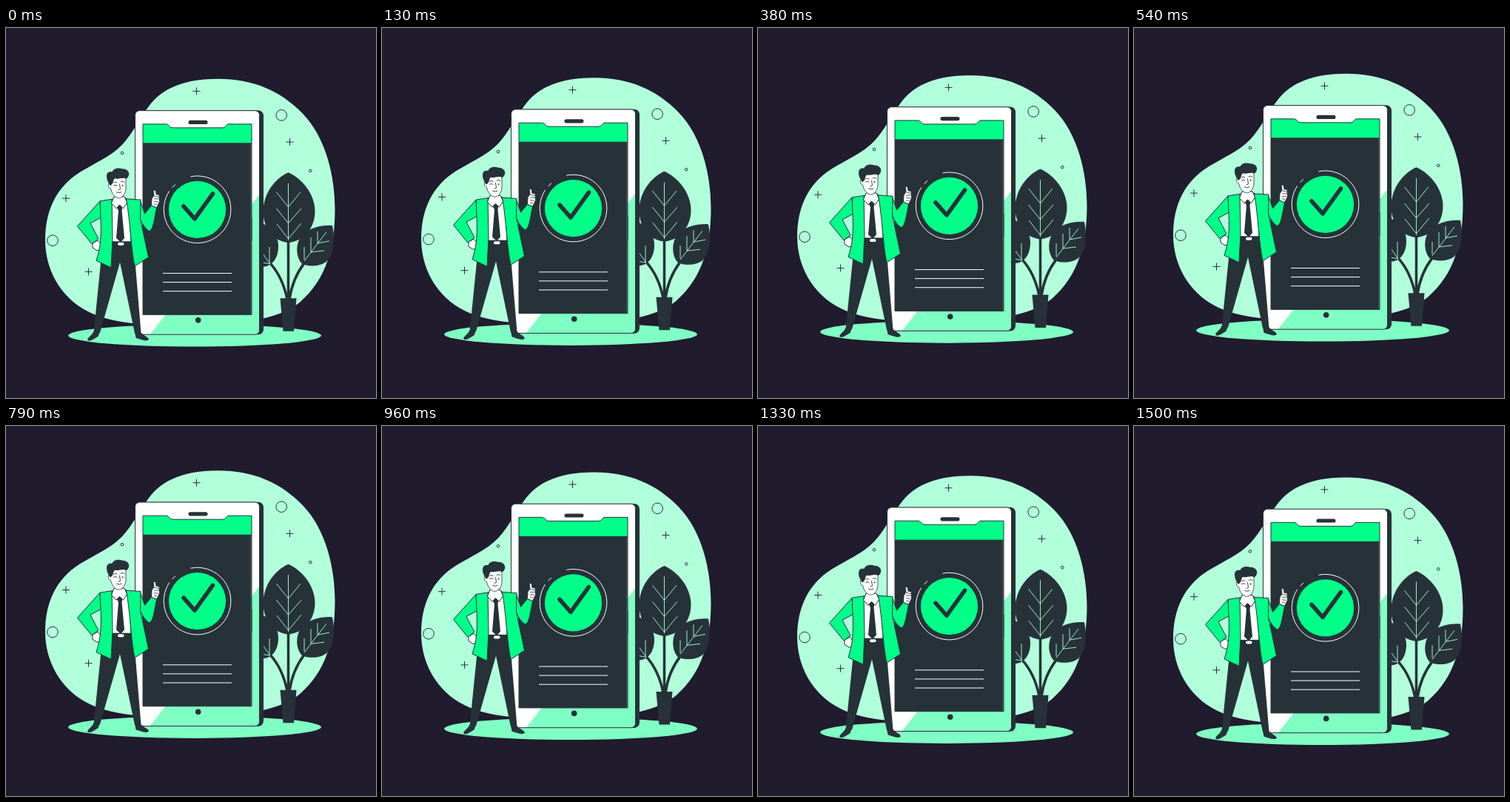
Recreate the animation shown at these times as an HTML page. Size 500 by 500 pixels, loop 1.54 s.

```html
<!DOCTYPE html>
<html lang="en">
<head>
<meta charset="utf-8">
<title>Payment confirmed</title>
<style>
  html, body { margin: 0; width: 100%; height: 100%; overflow: hidden; background: #201b2d; }
  svg { display: block; width: 100%; height: 100%; }
  .ink { fill: #263238; }
  .mint { fill: #80ffc4; }
  .green { fill: #00ff88; }
  .white { fill: #fff; }
  .line { fill: none; stroke: #263238; }
  .edge { stroke: #263238; stroke-linejoin: round; }
  .vein { fill: none; stroke: #b2ffdc; stroke-width: .9; }
  .thin { fill: none; stroke: #fff; }
</style>
</head>
<body>
<svg viewBox="0 0 500 500">
  <g id="scene">
    <path fill="#b2ffdc" d="M53 287C53 247 68 215 100 195C121 182 140 175 157 158C172 142 181 121 193 106C207 87 232 69 287 69C334 69 371 85 401 116C433 149 444.500 202 444.500 245C444.500 295 434 339 397 371C368 395 310 402 250 402C195 402 146 401 112 384C72 364 53 325 53 287Z"/>
    <ellipse class="mint" cx="255" cy="415.700" rx="171" ry="15"/>
    <path class="line" d="M252.500 85.500h10m-5-5v10M378.500 154.200h10m-5-5v10M76 230.300h10m-5-5v10M106.500 329.500h10m-5-5v10"/>
    <g class="line">
      <circle cx="372.200" cy="118" r="7.300"/>
      <circle cx="63" cy="287.300" r="7.300"/>
      <circle cx="157" cy="169" r="1.800"/>
      <circle cx="411.300" cy="193" r="1.800"/>
    </g>

    <g id="plant">
      <path class="ink" d="M381.500 195.500C399 203 417.500 224 417.500 248C417.500 270 403 288 381.500 290.500C360 288 347.500 270 347.500 248C347.500 224 364 203 381.500 195.500Z"/>
      <path class="ink" d="M340 262C356 266 368 279 368 295C368 311 360 323 346 323Z"/>
      <path class="ink" d="M441 267C445 286 443 305 434 315C425 323 410 323 400 319C391 309 391 291 400 280C410 270 426 266 441 267Z"/>
      <path class="line" stroke-width="3.500" d="M381.500 288V368M357 318Q374 337 380 367M403 318Q387 339 383 367"/>
      <path class="ink" d="M370.500 365.500H392.500L389 410H374.500Z"/>
      <path class="vein" d="M381.500 210V287M365.500 222L381.500 242L398 222M365.500 244L381.500 264L399 244M366 265L381.500 285L399 264"/>
      <path class="vein" d="M433 276L403 315M421 291V275M421 291L437 288M412 303V283M412 303L430 301M403 313V296"/>
      <path class="vein" d="M357 319L347 305M356 318V296M357 319L346 317"/>
    </g>

    <g id="phone">
      <rect class="ink" x="178" y="111.500" width="170" height="303" rx="7"/>
      <rect class="white" x="174.500" y="111.800" width="168" height="302.500" rx="6"/>
      <path class="mint" d="M342 226V408Q342 413.800 336 413.800H195Z"/>
      <rect class="line" x="174.500" y="111.800" width="168" height="302.500" rx="6"/>
      <rect class="ink edge" x="185" y="156" width="147" height="131.500" transform="translate(0 100)"/>
      <rect class="ink edge" x="185" y="156" width="147" height="131.500"/>
      <path class="green edge" d="M185 130H216C221 130 220 135 226 135H292C298 135 297 130 301 130H332V156H185Z"/>
      <path d="M331 157V387" stroke="#66757a" stroke-width=".8"/>
      <rect class="ink" x="246.500" y="125" width="26" height="5.200" rx="2.600"/>
      <circle class="ink" cx="259.700" cy="395" r="3.800"/>
      <circle class="green" cx="258.500" cy="245.500" r="38.600"/>
      <path class="thin" d="M249.500 201A45.300 45.300 0 1 1 220.700 220.500M224.500 215.800L229 211.500"/>
      <path class="line" stroke-width="5.500" stroke-linecap="round" stroke-linejoin="round" d="M240 241L255 258L279.500 224"/>
      <path class="thin" d="M212 331.600H305M212 343.700H305M212 355.800H305"/>
    </g>

    <g id="man">
      <path class="ink" d="M142 288H171L175 322L182.500 413H174L154 317L127 412H118.500L128 318Z"/>
      <path class="ink" d="M118.500 410H127L124.500 417C119 420 115 424 110.500 422.500C109 418 116 417 118.500 410ZM174 411H182C185 416 192 417 193 421C190 425 182 421 175.500 419Z"/>
      <path class="white edge" d="M142 233L147 229H160L166 233L169 289H142Z"/>
      <path class="ink" d="M149.500 242L153 239L157.500 242L156.500 247L160 284L155 290L149 284L152 247Z"/>
      <path class="ink" d="M142 289H170V294H142Z"/>
      <rect class="white" x="151" y="290" width="8.500" height="4" rx="2"/>
      <path class="white edge" d="M117 291L124 287L130 294L130 299L123 301L117 297Z"/>
      <path class="green edge" d="M127 234L96.500 268L116 292L125 285L114 264L129 256Z"/>
      <path class="green edge" d="M127 234L143 231.500L144 285L142 324L122 314.500C128 296 129 282 128 257Z"/>
      <path class="green edge" d="M181 232L187.500 251L196.500 240L203.500 243C201 255 199 273 194 274.500C189 273 185 266 181 258Z"/>
      <path class="green edge" d="M162.500 231L182 232.300L181.500 258L192.500 310L174 322C169 300 168 262 162.500 231Z"/>
      <path class="white edge" d="M146 228L142.500 237L149 244L153.500 239L158.500 244L163.500 236L160 228Z"/>
      <path class="white edge" d="M196.500 240L197 231L200 226L199 220Q201 217.500 202.500 221L203 225L207 225.500L207.500 235L203.500 243Z"/>
      <path class="line" stroke-width=".8" d="M200 227L207 228.500M200 231H207M200 234.500L206 235M200 238L204 238.500"/>
      <path class="white edge" stroke-width=".8" d="M140 202H162V218C161 226 156 230 152.500 230C148 230 143 225 141.500 217C138 217 137 210 140.500 209Z"/>
      <path class="ink" d="M141 213.500C137 208 135 202 136.500 197.500C138 194 141 194.500 143.500 194.500C146 189 153 189 157 190.500C163 190 167.500 195 166 199C165 203 162 205 160.500 203C156 202 151 205 147 203.500C144.500 206 145 210 143.500 211Z"/>
      <path class="line" stroke-width=".9" stroke-linecap="round" d="M145.500 209Q148 207 150 209M155 208Q157.500 206 160 208.500M145.500 213Q148 211.500 150 213M153.500 211L154.500 218L152 219M149.500 222Q153 224 156 222"/>
      <circle class="ink" cx="157.500" cy="213" r="1"/>
    </g>
  </g>
</svg>
<script>
  const scene = document.getElementById('scene');
  const LOOP = 1540, RISE = 10, LEAD = 40;
  const start = performance.now();

  // Steady rise and fall of the whole scene.
  function draw(now) {
    const phase = (Math.max(0, now - start) + LEAD) % LOOP / LOOP;
    const lift = 1 - Math.abs(2 * phase - 1);
    scene.setAttribute('transform', `translate(0 ${0.4 - RISE * lift})`);
    requestAnimationFrame(draw);
  }
  draw(start);
</script>
</body>
</html>
```
